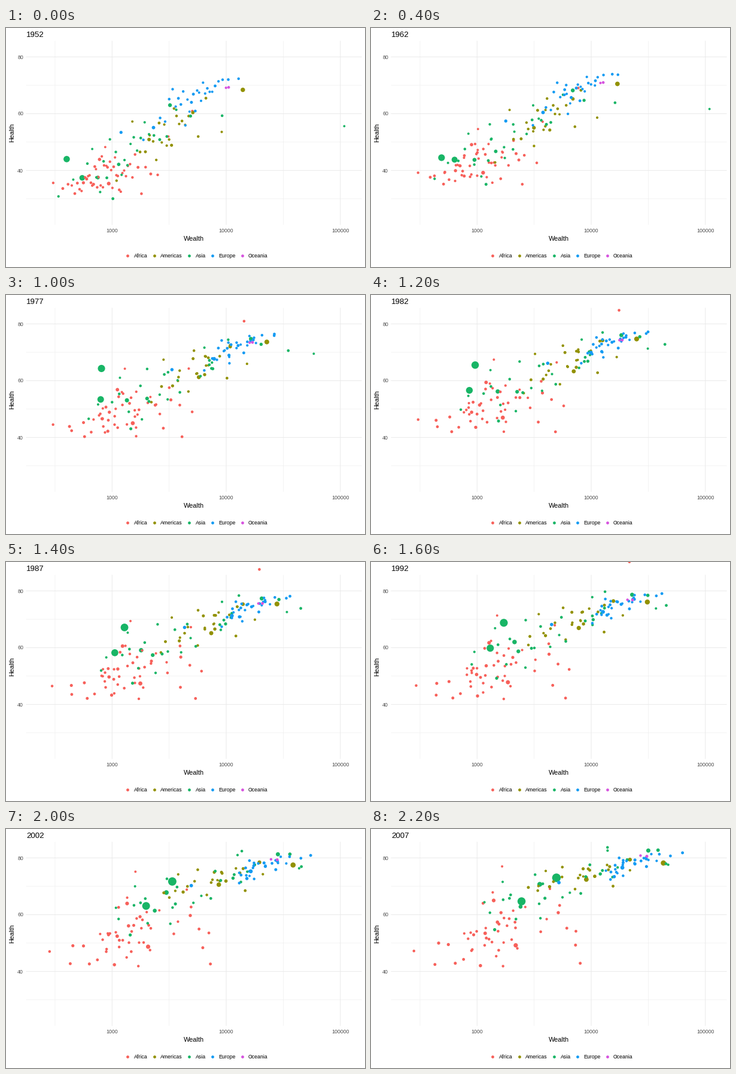
A matplotlib script that plays this animation: 600 by 400 pixels, repeating every 2.4 s.

```python
import numpy as np
import matplotlib.pyplot as plt
from matplotlib.animation import FuncAnimation

STEPS = 12
PT = 0.72  # points per pixel at 100 dpi
MARKS = [0, 6, 11]  # steps at which the crowd statistics are given

plt.rcParams["font.family"] = "Liberation Sans"
rng = np.random.default_rng(5)
step = np.arange(STEPS)

COLORS = {
    "Africa": "#f7605a",
    "Americas": "#929100",
    "Asia": "#18b566",
    "Europe": "#149bf3",
    "Oceania": "#d653df",
}

# Dots that stand out: (step, wealth, health) key points and population range
LEADERS = [
    ("Asia", (556, 1319), [(0, 400, 44), (2, 488, 44.5), (4, 677, 63.1),
                           (6, 962, 65.5), (9, 2289, 70.4), (11, 4959, 73)]),
    ("Asia", (372, 1110), [(0, 547, 37.4), (6, 856, 56.6), (11, 2452, 64.7)]),
    ("Asia", (82, 224), [(0, 750, 37.5), (6, 1517, 56.2), (11, 3541, 70.7)]),
    ("Asia", (86, 127), [(0, 3217, 63), (4, 14779, 73.4), (11, 31656, 82.6)]),
    ("Asia", (0.2, 2.5), [(0, 108382, 55.6), (4, 109348, 67.7),
                          (6, 31354, 71.3), (11, 47307, 77.6)]),
    ("Americas", (158, 301), [(0, 13990, 68.4), (6, 25010, 74.7), (11, 42952, 78.2)]),
    ("Americas", (57, 190), [(0, 2109, 50.9), (6, 7031, 63.3), (11, 9066, 72.4)]),
]

# Mean and spread of log wealth and of health at MARKS
CROWDS = {
    "Africa": dict(count=52, link=0.4, skew=(0.1, 0.15),
                   wealth=([2.97, 3.17, 3.23], [0.25, 0.33, 0.37]),
                   health=([38.8, 51.6, 54.8], [4.8, 6.8, 9])),
    "Americas": dict(count=23, link=0.7, skew=(0, -0.1),
                     wealth=([3.5, 3.8, 3.9], [0.23, 0.24, 0.3]),
                     health=([53, 66.2, 73.5], [8, 6.3, 4])),
    "Asia": dict(count=28, link=0.65, skew=(0.1, -0.1),
                 wealth=([3.13, 3.6, 3.75], [0.34, 0.48, 0.5]),
                 health=([46, 62.3, 70.3], [8, 7.5, 7])),
    "Europe": dict(count=30, link=0.85, skew=(-0.1, -0.2),
                   wealth=([3.68, 4.15, 4.34], [0.24, 0.2, 0.24]),
                   health=([64.6, 72.8, 77.6], [5.8, 3.1, 2.9])),
    "Oceania": dict(count=2, link=0.9, skew=(0, 0),
                    wealth=([4.01, 4.26, 4.46], [0.02, 0.03, 0.12]),
                    health=([69.2, 74.3, 80.7], [0.3, 0.6, 0.9])),
}


def px(log_wealth):
    return 177.3 + 190.7 * (log_wealth - 3)


def py(health):
    return 48.4 + 4.75 * (80 - health)


def radius(pop):
    return 1.85 + 5.35 * np.sqrt(pop / 1319)


def scores(n):
    """Evenly spread, roughly normal scores in random order."""
    p = (rng.permutation(n) + 0.5) / n
    return np.log(p / (1 - p)) / 1.9


def drift(n):
    """Scores per step that turn slowly from one draw towards another."""
    angle = np.linspace(0, 0.5, STEPS)[:, None]
    return np.cos(angle) * scores(n) + np.sin(angle) * scores(n)


def spread(z, skew, stats):
    mean, width = (np.interp(step, MARKS, s)[:, None] for s in stats)
    return mean + width * (z + skew * (z ** 2 - 1))


def crowd(count, link, skew, wealth, health):
    a, b = drift(count), drift(count)
    x = spread(a, skew[0], wealth)
    y = spread(link * a + np.sqrt(1 - link ** 2) * b, skew[1], health)
    pop = 7 * np.exp(1.1 * scores(count)) * 2 ** (step / 11 - 0.5)[:, None]
    return px(x), py(y), radius(pop)


def leader(pops, keys):
    k, wealth, health = np.array(keys).T
    x = np.interp(step, k, np.log10(wealth))
    y = np.interp(step, k, health)
    parts = px(x), py(y), radius(np.geomspace(*pops, STEPS))
    return [part[:, None] for part in parts]


parts = [leader(pops, keys) for _, pops, keys in LEADERS]
colors = [COLORS[name] for name, *_ in LEADERS]
for name, rule in CROWDS.items():
    parts.append(crowd(**rule))
    colors += [COLORS[name]] * rule["count"]
X, Y, R = (np.hstack(p) for p in zip(*parts))

fig = plt.figure(figsize=(6, 4), dpi=100, facecolor="white")
ax = fig.add_axes([0, 0, 1, 1])
ax.set(xlim=(0, 600), ylim=(400, 0))
ax.axis("off")


def label(x, y, text, size, color="black", **kw):
    return ax.text(x, y, text, fontsize=size * PT, color=color, va="baseline", **kw)


def area(r):
    return (2 * PT * np.asarray(r)) ** 2


def grid(xs, ys, width):
    style = dict(color="#ebebeb", lw=width * PT, zorder=1, snap=False)
    for x in xs:
        ax.plot([x, x], [22, 329], **style)
    for y in ys:
        ax.plot([34, 594], [y, y], **style)


grid(px(np.array([2.5, 3.5, 4.5])), py(np.array([30, 50, 70])), 0.55)
grid(px(np.array([3, 4, 5])), py(np.array([40, 60, 80])), 1.07)

for power in (3, 4, 5):
    label(px(power), 342.2, str(10 ** power), 8.8, "#4d4d4d", ha="center")
for value in (40, 60, 80):
    label(29, py(value) + 3.1, str(value), 8.8, "#4d4d4d", ha="right")
label(314, 355.5, "Wealth", 11, ha="center")
label(13, 175.5, "Health", 11, ha="center", rotation=90, rotation_mode="anchor")

for (name, color), x in zip(COLORS.items(), (203.4, 247.6, 306.1, 345.2, 394.6)):
    ax.scatter(x, 380.5, s=area(2.4), c=color, lw=0)
    label(x + 10.5, 383.8, name, 8.8)

title = label(34, 15.2, "1952", 13.2)
dots = ax.scatter(X[0], Y[0], s=area(R[0]), c=colors, lw=0, zorder=3)


def update(k):
    dots.set_offsets(np.column_stack([X[k], Y[k]]))
    dots.set_sizes(area(R[k]))
    title.set_text(str(1952 + 5 * k))
    return dots, title


anim = FuncAnimation(fig, update, frames=STEPS, interval=200, repeat=True, repeat_delay=0)
plt.show()
```
